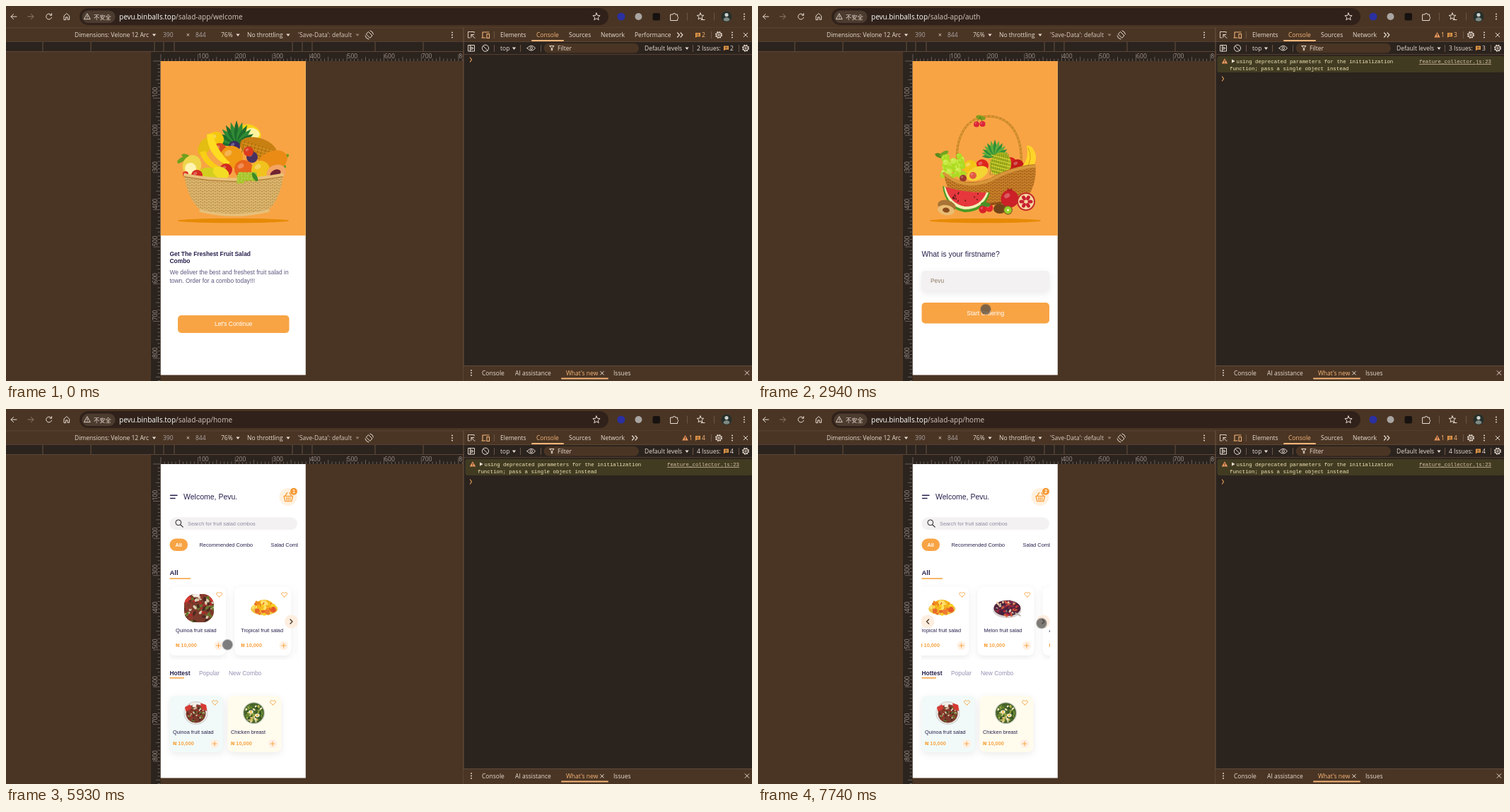
Write an HTML page that moves like this. It is 1055 px wide and 531 px high and loops after 8000 ms.

```html
<!DOCTYPE html>
<html lang="en">
<head>
<meta charset="utf-8">
<title>Salad app walkthrough</title>
<style>
html, body { margin: 0; width: 100%; height: 100%; overflow: hidden; background: #4a3524; }
svg { display: block; width: 100%; height: 100%; }
text { white-space: pre; }
.ui { font-family: "Open Sans", "Noto Sans", "Noto Sans CJK SC", sans-serif; }
.app { font-family: "Liberation Sans", Arial, sans-serif; }
.mono { font-family: "Liberation Mono", monospace; }
.soft { filter: drop-shadow(0 3px 5px rgba(40, 40, 40, .09)); }
</style>
</head>
<body>
<svg id="stage" viewBox="0 0 1055 531" preserveAspectRatio="none"></svg>
<script>
const LOOP = 8000;
const INK = '#e9ddd2', DIM = '#8d7a6b', GOLD = '#f6b679', BAR = '#4a3524', DARK = '#2b231e';
const ORANGE = '#f8a445', NAVY = '#27214d';
const USER = 'Pevu';

let seed = 11;
const rnd = () => (seed = seed * 16807 % 2147483647) / 2147483647;
const range = (n, f) => Array.from({ length: n }, (_, i) => f(i)).join('');

const text = (x, y, s, size = 8.5, fill = INK, cls = 'ui', more = '') =>
  `<text x="${x}" y="${y}" font-size="${size}" fill="${fill}" class="${cls}" ${more}>${s}</text>`;
const app = (x, y, s, size = 7.36, fill = NAVY, more = '') => text(x, y, s, size, fill, 'app', more);
const rect = (x, y, w, h, fill, r = 0, more = '') =>
  `<rect x="${x}" y="${y}" width="${w}" height="${h}" rx="${r}" fill="${fill}" ${more}/>`;
const oval = (x, y, rx, ry, fill, rot = 0) =>
  `<ellipse cx="${x}" cy="${y}" rx="${rx}" ry="${ry}" fill="${fill}" transform="rotate(${rot} ${x} ${y})"/>`;
const dot = (x, y, r, fill) => oval(x, y, r, r, fill);
const shape = (d, fill, more = '') => `<path d="${d}" fill="${fill}" ${more}/>`;
const line = (d, color = INK, w = 1, more = '') =>
  `<path d="${d}" fill="none" stroke="${color}" stroke-width="${w}" stroke-linecap="round" stroke-linejoin="round" ${more}/>`;
const ring = (x, y, r, color = INK, w = 1, more = '') =>
  `<circle cx="${x}" cy="${y}" r="${r}" fill="none" stroke="${color}" stroke-width="${w}" ${more}/>`;
const group = (id, body) => `<g id="${id}">${body}</g>`;

const caret = (x, y, c = INK) => shape(`M${x - 2.6} ${y - 1.5}h5.2l-2.6 3.6z`, c);
const kebab = (x, y) => [-3.5, 0, 3.5].map(d => dot(x, y + d, .95, INK)).join('');
const cross = (x, y, r = 2.8) => line(`M${x - r} ${y - r}l${2 * r} ${2 * r}m0 ${-2 * r}l${-2 * r} ${2 * r}`);
const gear = (x, y) => ring(x, y, 4.2, INK, 1.6, 'stroke-dasharray="2 1.3"') + ring(x, y, 3.4) + ring(x, y, 1.2);
const sep = (x, y, h = 10) => rect(x, y - h / 2, 1, h, '#6b5644');
const chevron = (x, y, dx, color, w = 1.2) => line(`M${x - dx} ${y - 3}l${2 * dx} 3l${-2 * dx} 3`, color, w);
const star = (x, y, r) => line('M' + Array.from({ length: 10 }, (_, i) => {
  const a = -Math.PI / 2 + i * Math.PI / 5, k = i % 2 ? r * .45 : r;
  return (x + k * Math.cos(a)).toFixed(1) + ' ' + (y + k * Math.sin(a)).toFixed(1);
}).join('L') + 'z');
const bubble = (x, y) => shape(`M${x - 3.5} ${y - 3}h7v5.2h-5l-2 1.8z`, '#f0a04a') +
  rect(x - 2, y - 1.6, 4, .8, BAR) + rect(x - 2, y + .1, 4, .8, BAR);
const warn = (x, y) => shape(`M${x} ${y - 3.8}l4.2 7.4h-8.4z`, '#f09a5e') +
  rect(x - .5, y - 1.4, 1, 2.4, DARK) + rect(x - .5, y + 1.7, 1, 1, DARK);

function browserBar() {
  return rect(0, 0, 1055, 31, BAR) +
    line('M15 15h-8m3.6-3.6l-3.6 3.6l3.6 3.6') + line('M31 15h8m-3.6-3.6l3.6 3.6l-3.6 3.6', DIM) +
    line('M64 12.6a4 4 0 1 0 .6 3.6M64.6 10.6v2.6h-2.6') + line('M82 19.2v-5.2l3.8-3.4l3.8 3.4v5.2h-2.6v-3.4h-2.4v3.4z') +
    rect(104, 3, 748, 24, '#30221a', 12) + rect(107.5, 6.5, 47, 17.5, '#4c3b2f', 9) +
    line('M115 11l4.2 7.6h-8.4zM115 13.8v2M115 17v.1', INK, .9) + text(124, 18.5, '不安全', 8.2) +
    ['welcome', 'auth', 'home'].map(p => group('url-' + p, text(160, 18.6,
      `${USER.toLowerCase()}.binballs.top<tspan fill="#d5c8bc">/salad-app/${p}</tspan>`, 10, '#fff'))).join('') +
    star(835, 15.3, 5.4) + dot(870, 15, 5.5, '#2b30a0') + dot(894.5, 15, 5, '#a9a5a2') + rect(914.5, 10, 10.5, 10.5, '#17120f', 2) +
    line('M940 12h3.2a1.7 1.7 0 0 1 3.4 0h3v3a1.7 1.7 0 0 1 0 3.2v2.3h-9.6z') +
    sep(963, 15, 11) + star(982, 14.8, 5) + line('M983 19.5h5') + sep(1001, 15, 11) +
    dot(1019, 15, 7.5, '#25302b') + dot(1019, 12.5, 2.6, '#cfd2cf') + shape('M1014.5 20a4.5 4 0 0 1 9 0a7 7 0 0 1 -9 0z', '#7f8a84') + kebab(1044, 15);
}

function deviceBar() {
  const grey = '#aba2a4';
  return rect(0, 30.5, 1055, .8, '#5d4736') +
    text(97, 44, 'Dimensions: Velone 12 Arc') + caret(209.5, 41) + text(222, 44, '390', 8.5, grey) + text(255, 44, '×') +
    text(268, 44, '844', 8.5, grey) + text(304, 44, '76%') + caret(328, 41) + text(341, 44, 'No throttling') + caret(399, 41) +
    text(413, 44, "'Save-Data': default", 8.5, '#d9cbbf') + caret(497, 41, DIM) +
    line('M509.5 39.5l3-3l5.500 5.500l-3 3zM508 42a6 6 0 0 0 5 5M515 35a6 6 0 0 1 4.500 5') + kebab(631, 41) +
    rect(0, 50, 647, 15, DARK) + rect(0, 50, 647, .8, '#5d4736') + rect(0, 64, 647, 1, '#5d4736') +
    [52, 120, 210, 223, 238, 405, 419, 433, 522, 590].map(x => rect(x - .5, 51, 1, 13, '#685241')).join('');
}

function rulers() {
  const step = 5.262, c = '#83776e', len = i => i % 10 ? i % 5 ? 3.5 : 6 : 10;
  const label = (i, more) => i && i % 10 == 0 ? text(0, 0, i * 10, 8.6, '#a2958b', 'ui', more) : '';
  return `<g clip-path="url(#rulerClip)">` + rect(205, 65, 442, 13, DARK) + rect(205, 65, 13.5, 466, DARK) +
    range(82, i => rect(218.6 + i * step, 78 - len(i), .7, len(i), c) + label(i, `transform="translate(${219.4 + i * step} 74)"`)) +
    range(87, i => rect(218 - len(i), 77.6 + i * step, len(i), .7, c) + label(i, `transform="translate(213.5 ${77 + i * step}) rotate(-90)"`)) + '</g>';
}

function devtools() {
  const issue = n => group('count' + n, (n == 2
    ? text(889, 44, 'Performance') + chevron(951, 41, 1.4, INK) + chevron(955.5, 41, 1.4, INK)
    : chevron(887, 41, 1.4, INK) + chevron(891.5, 41, 1.4, INK) + warn(960.5, 40.8) + text(966, 44, '1', 8.5, GOLD)) +
    text(984, 44, n, 8.5, GOLD) + text(977, 62.6, n + ' Issues:') + text(1024, 62.6, n));
  return rect(647, 31, 408, 20, BAR) + rect(647, 51, 408, 459, DARK) + rect(646.5, 31, 1, 500, '#6b5443') +
    rect(647, 50, 408, .8, '#5f4938') + rect(647, 68.3, 408, .8, '#5f4938') +
    line('M662 38v-1.5h-8.5v8.5h2.5', INK, 1, 'stroke-dasharray="1.5 1"') + line('M658 40.5l5 5m-5-1.2v-3.8h3.8') +
    line('M674 44.5v-7.5h9M673 45h5M680 39.5h3.5v6h-3.5z', GOLD, 1.1) + sep(690, 41) +
    text(699, 44, 'Elements') + text(750, 44, 'Console', 8.5, GOLD) + rect(743, 48, 46, 2, GOLD, 1) +
    text(796, 44, 'Sources') + text(841, 44, 'Network') + bubble(978.5, 41) + sep(997, 41) + gear(1008, 41) + kebab(1027, 41) + cross(1046, 41) +
    line('M654 55.5h8.5v8.5h-8.5zM656.5 55.5v8.5M658.5 58l2.5 1.8l-2.5 1.8z') + ring(678, 59.7, 4.6) + line('M674.8 56.5l6.4 6.4') + sep(690, 60) +
    text(699, 62.6, 'top') + caret(718.5, 60) + sep(727, 60) + line('M737 59.7q5.8-7 11.6 0q-5.8 7-11.6 0z') + ring(742.8, 59.7, 1.7) + sep(756, 60) +
    rect(760.5, 53, 134.5, 13.5, BAR, 6.7) + line('M769 56.5h6l-2.3 3v3.2h-1.4v-3.2z') + text(780, 62.6, 'Filter') +
    text(903, 62.6, 'Default levels') + caret(963, 60) + sep(971, 60) + bubble(1018.5, 59.5) + sep(1036, 60) + gear(1046, 59.7) +
    [2, 3, 4].map(issue).join('') +
    group('prompt', chevron(657.5, 76, 1.1, '#e8a05c')) +
    group('warning', rect(649.5, 71, 406, 23, '#413b22', 3) + warn(660, 78) + shape('M670 75.5l4.6 2.6l-4.6 2.6z', INK) +
      text(676.5, 81, 'using deprecated parameters for the initialization', 7.4, '#f3e5b5', 'mono') +
      text(667, 91, 'function; pass a single object instead', 7.4, '#f3e5b5', 'mono') +
      text(935, 81, 'feature_collector.js:23', 7.4, '#d9c3a6', 'mono', 'text-decoration="underline"')) +
    rect(647, 509.5, 408, 21.5, BAR) + rect(647, 509, 408, .8, '#6b5443') + kebab(658, 519.5) +
    text(673, 522.7, 'Console') + text(720, 522.7, 'AI assistance') + text(792, 522.7, "What's new", 8.5, GOLD) + cross(843, 519.8, 2.3) +
    rect(785, 526.5, 67, 2, GOLD, 1) + text(859, 522.7, 'Issues') + cross(1048, 519.5);
}

const crown = (x, y, r, light, dark) => range(13, i => {
  const k = r * (1 - Math.abs(i - 6) * .04);
  return shape(`M${x} ${y}q${-r * .2} ${-k * .5} 0 ${-k}q${r * .2} ${k * .5} 0 ${k}`, i % 2 ? light : dark,
    `transform="rotate(${(i - 6) * 15} ${x} ${y})"`);
});
const leaf = (x, y, rot, c = '#6f9f1d') => oval(x, y, 7, 3, c, rot);
const ball = (x, y, r, c, hi = '#ffffff44') => dot(x, y, r, c) + oval(x - r * .3, y - r * .35, r * .35, r * .25, hi, -30);
const woven = (d, fill, pattern) => shape(d, fill) + shape(d, `url(#${pattern})`);

function fullBasket() {
  const bowl = 'M252 238Q321 251 392 238Q389 272 371 289Q322 303 275 289Q256 272 252 238z';
  return oval(344, 181, 17, 13, '#f7d21a', 20) + oval(349, 180, 10, 7, '#fff3a0', 20) +
    crown(326, 195, 33, '#2f8a35', '#1d6b2c') +
    oval(357, 202, 27, 15, '#c98012', 18) + range(10, i => line(`M${333 + i * 5} ${189 + i * 1.7}l-5 18`, '#96600f', .8)) +
    range(4, i => line(`M${335 + i} ${194 + i * 5}l44 12`, '#e0a32c', .8)) +
    leaf(248, 218, -35) + leaf(255, 213, 20) + leaf(394, 214, -30) + leaf(390, 225, 30) + leaf(283, 198, -35, '#4a8f23') +
    ball(297, 189, 11, '#f4c70f') + oval(281, 199, 14, 8, '#e3bd12', -60) + ball(302, 204, 10, '#d94e1d') +
    ball(323, 199, 8, '#3b2b62') + oval(376, 221, 23, 15, '#ea8b16', -25) + ball(348, 214, 8, '#4a315f') +
    oval(263, 226, 13, 15, '#efd54a', 15) + oval(261, 230, 8, 8, '#fff4b1') +
    ball(343, 206, 7, '#dc3b1d') + ball(319, 214, 16, '#f09a13') +
    shape('M284 182q1 29 27 43l6-3q-19-17-25-42z', '#ffdc22') + shape('M274 207q6 19 24 25l4-4q-16-9-20-23z', '#f9ce16') +
    ball(336, 231, 13, '#e9651b') + ball(311, 232, 9, '#cf2a1c') + ball(360, 232, 13, '#f1c21d') +
    oval(293, 239, 20, 9, '#d3cf1e', 15) + oval(304, 236, 12, 8, '#f2dc24', 25) + ball(270, 240, 8, '#d42d20') +
    oval(382, 236, 14, 11, '#f4a563', -25) + oval(381, 237, 8, 5, '#702431', -25) + ball(254, 238, 4, '#df3124') +
    woven(bowl, '#d6ab60', 'straw') +
    line('M253 239Q321 252 391 239', '#e9c27a', 4) + line('M253 242Q321 255 391 242', '#a9722d', 1) +
    line('M275 290Q322 302 371 290', '#e6c07a', 3.5) +
    range(20, i => ball(329 + i % 6 * 4.5 + rnd() * 2, 238 + Math.floor(i / 6) * 3.5, 3, '#a9c62c')) + leaf(352, 242, 60, '#3c8a25');
}

function handleBasket() {
  const body = 'M263 235Q290 258 328 244Q360 226 392 224Q395 248 383 268Q335 286 286 281Q265 262 263 235z';
  const rope = 'M286 240C274 205 285 157 326 156C362 157 374 190 372 224';
  return line(rope, '#bf7d22', 3) + line(rope, '#e0a038', 1.6, 'stroke-dasharray="3 2.5"') +
    leaf(315, 158, 15, '#7d9c20') + line('M309 165l5-8l4 8', '#517a22', .8) + ball(309, 167.5, 4, '#dd2538') + ball(317.5, 167, 4, '#dd2538') +
    leaf(257, 212, 20, '#588a1c') + leaf(263, 209, -30, '#74a323') +
    ball(317, 226, 9, '#dd241e') + ball(357, 223, 9, '#d9201d') + ball(367, 226, 9, '#c31b18') + ball(300, 228, 10, '#f3c417') +
    crown(335, 213, 24, '#5fae3c', '#2f8f38') +
    oval(343, 224, 15, 17, '#a9b31d', 15) + range(8, i => line(`M${333 + i * 3} 210l-5 29`, '#6f8a19', .8)) + range(6, i => line(`M330 ${211 + i * 5}l27 7`, '#e8df3d', 1)) +
    shape('M380 198q9-2 13 14q1 16-13 20q-11 1-8-4q12-10 8-30z', '#ffd428') + line('M382 201q8 15-3 29', '#d99b16', 1) +
    range(50, i => ball(261 + rnd() * 30, 211 + rnd() * 31, 4, i % 3 ? '#aedb22' : '#c9ea45')) +
    oval(310, 237, 16, 9, '#f4d433', -25) + ball(290, 244, 5, '#9e3a2c') + ball(304, 240, 5, '#e25a45') +
    woven(body, '#c1751f', 'wicker') + line('M263 237Q290 261 328 247Q360 229 391 227', '#d8963a', 4) + line('M286 281Q335 286 382 268', '#8c4d16', 3) +
    shape('M261 255Q295 266 328 264Q321 292 292 292Q265 287 261 255z', '#4c9a22') +
    shape('M263 256Q295 266 326 264Q318 288 292 288Q268 284 263 256z', '#f1f0b5') +
    shape('M265 256Q295 265 323 264Q315 284 293 284Q271 280 265 256z', '#e6373c') +
    range(14, () => oval(274 + rnd() * 38, 264 + rnd() * 13, .7, 1.3, '#4f1519')) +
    ball(356, 273, 12.5, '#cc1f28') + shape('M352 262l1-4l3 2l3-2l1 4z', '#b21d22') +
    dot(379, 277, 13, '#c42b2b') + dot(379, 277, 11, '#f6d7a0') + range(6, i => oval(379 + 6 * Math.cos(i * 1.047), 277 + 6 * Math.sin(i * 1.047), 3.6, 2.5, '#c91f31', i * 60)) +
    oval(342, 287, 9, 7, '#75451a') + dot(353.5, 289, 6.5, '#88591f') + dot(353.5, 289, 5.3, '#93cc27') + dot(353.5, 289, 1.8, '#edf0b5') +
    ball(318, 288, 5.5, '#d9222a') + ball(327, 286, 5.5, '#e5262d') + leaf(322, 281, 10, '#4a8e27') +
    oval(267, 283, 13, 8, '#a87335', 15) + oval(266, 289, 12, 7, '#e9bd73', 10) + oval(266, 289, 5, 3.5, '#8a4c1c', 10);
}

// Food plates are centred on 0,0 and built from scattered pieces.
function scatter(n, rx, ry, colors, size) {
  return range(n, i => {
    const a = rnd() * 6.283, k = Math.sqrt(rnd()) * .9;
    return oval((Math.cos(a) * rx * k).toFixed(1), (Math.sin(a) * ry * k).toFixed(1), size * (.6 + rnd() * .7), size * .6, colors[i % colors.length], Math.round(rnd() * 180));
  });
}
const food = {
  quinoa: oval(0, 0, 21, 20, '#cfd0cf') + oval(0, 0, 19.5, 18.5, '#efefed') + oval(0, 1, 17, 16, '#7a3a2b') +
    scatter(95, 17, 16, ['#a92c2a', '#4b2922', '#d9c9ae', '#68762f', '#8e3c2e'], 2) +
    shape('M8-17l10 3l1 11l-9-4zM-19-10l9-5l3 7l-10 6z', '#d63a33') + shape('M-7-18l9 0l-2 8l-5 0z', '#f3ebe2'),
  tropical: oval(0, 1, 19, 9, '#efc545') + oval(0, -3, 13, 9, '#f2b61c') + scatter(48, 18, 10, ['#f7cf23', '#ef8b1c', '#f3b11d', '#e9602a', '#ffe16a'], 3.2) +
    dot(-10, 4, 3.4, '#e8692c') + dot(4, 5, 3.4, '#ee7c35') + dot(13, 1, 3, '#e6552c'),
  melon: oval(0, 3, 20, 11, '#d9d2d0') + oval(0, 0, 19, 11, '#53233b') + scatter(65, 18, 12, ['#b4243a', '#37233f', '#7b2e48', '#e8c7a5', '#d15a3c'], 2.4) + line('M12 7l9 5', '#b8b0ae', 2),
  chicken: oval(0, 0, 19, 19, '#cfcfc8') + oval(0, 0, 17.5, 17.5, '#47652a') + scatter(75, 17, 17, ['#6d8d32', '#2f4a22', '#d9c064', '#f0e6c0', '#98a941'], 2.4) +
    oval(-5, -2, 4, 3, '#f7f0d6') + dot(-5, -2, 1.7, '#eeb52b') + oval(6, 4, 4, 3, '#f7f0d6') + dot(6, 4, 1.7, '#eeb52b')
};
const plate = (x, y, kind, scale = 1, id = '') =>
  `<g class="photo" transform="translate(${x} ${y}) scale(${scale})" clip-path="url(#plateClip)"><g ${id && `id="${id}"`}>${food[kind]}</g></g>`;
const heart = (x, y) => line(`M${x} ${y + 3}q-6-4-3-6q2-1 3 1q1-2 3-1q3 2-3 6z`, ORANGE, .9);
const plus = (x, y) => dot(x, y, 6.2, '#fff1e4') + line(`M${x - 3} ${y}h6m-3-3v6`, ORANGE, 1);
const price = (x, y) => app(x, y, '₦ 10,000', 7.36, ORANGE, 'font-weight="bold"');
const card = (x, name, kind, id) => rect(x, 252, 80, 97, '#fff', 8, 'class="soft"') + plate(x + 42, 282, kind, 1, id) +
  heart(x + 70.5, 263) + app(x + 9, 316, name) + price(x + 9, 337) + plus(x + 69.5, 335);
const hotCard = (x, name, kind, bg) => rect(x, 406, 76, 80, bg, 8, 'class="soft"') + plate(x + 37, 430.5, kind, .82) +
  heart(x + 64, 416) + app(x + 4.5, 460, name) + price(x + 4.5, 476) + plus(x + 63.5, 474);
const arrow = (x, dx) => dot(x, 301, 9.5, '#fdeee0') + chevron(x, 301, dx, '#4d3420', 1.4);

const hero = rect(218.5, 78, 206, 247, ORANGE) + oval(321.5, 304, 79, 3.2, '#e68a06');
const button = (x, y, w, h, label) => rect(x, y, w, h, ORANGE, 5) + app(x + w / 2, y + h / 2 + 2.8, label, 8.42, '#fff', 'text-anchor="middle"');

function welcome() {
  const bold = 'font-weight="bold"', soft = '#5d577e';
  return hero + fullBasket() + app(231.5, 354, 'Get The Freshest Fruit Salad', 8.42, NAVY, bold) + app(231.5, 364, 'Combo', 8.42, NAVY, bold) +
    app(231.5, 379.6, 'We deliver the best and freshest fruit salad in', 8.42, soft) +
    app(231.5, 392.3, 'town. Order for a combo today!!!', 8.42, soft) + button(243, 438, 157.5, 25, "Let's Continue");
}
function auth() {
  return hero + group('gift', handleBasket()) + app(231.5, 355, 'What is your firstname?', 10.5) +
    rect(231.5, 375, 180.5, 29.5, '#f3f1f1', 5, 'class="soft"') + app(244, 392, USER, 8.42, '#917c68') +
    group('error', app(231.5, 423, 'Name cannot be empty.', 7.36, '#ef4444')) + group('order', button(231.5, 420, 180.5, 29.5, 'Start Ordering'));
}
function home() {
  const names = ['Quinoa fruit salad', 'Tropical fruit salad', 'Melon fruit salad', 'Apple fruit salad'];
  const kinds = ['quinoa', 'tropical', 'melon', 'tropical'];
  return line('M232.5 122.3h9.5M232.5 126.5h6.5', NAVY, 1.5) + app(251, 128, `Welcome, ${USER}.`, 10.5) +
    dot(399, 124.5, 12.5, '#fff1e0') + line('M393 123.5h12.6l-1.8 7h-9zM394.8 123l3-4.5M403.8 123l-3-4.5M397 125.5v3M399.3 125.5v3M401.6 125.5v3', ORANGE, 1.4) +
    group('badge', dot(407, 116.8, 5, '#f39a35') + app(407, 119.2, '<tspan id="cart">1</tspan>', 6.6, '#fff', 'text-anchor="middle" font-weight="bold"')) +
    rect(231.5, 153.5, 180.5, 17.5, '#f3f1f1', 8.7) + ring(243.8, 160.8, 3.9, '#222', 1) + line('M246.8 163.8l3.4 3.4', '#222', 1.1) +
    app(257, 164.6, 'Search for fruit salad combos', 7.36, '#8e8ba5') +
    rect(231.5, 183.5, 25.5, 17.5, ORANGE, 8.7) + app(244.2, 194.6, 'All', 7.36, '#fff', 'text-anchor="middle" font-weight="bold"') +
    app(273.5, 194.6, 'Recommended Combo') + `<g clip-path="url(#listClip)">${app(374.5, 194.6, 'Salad Combo')}</g>` +
    app(231.5, 235, 'All', 9.47, NAVY, 'font-weight="bold"') + rect(231.5, 239.3, 29.5, 1.6, ORANGE) +
    `<g clip-path="url(#listClip)"><g id="track">${names.map((n, i) => card(231 + i * 92.2, n, kinds[i], 'zoom' + i)).join('')}` +
    group('flash', rect(385.5, 329, 13.5, 12, '#8fc3e4', 0, 'opacity=".8"')) + '</g>' + arrow(403.5, 1.5) + group('back', arrow(240, -1.5)) + '</g>' +
    app(231.5, 376.6, 'Hottest', 8.42, NAVY, 'font-weight="bold"') + rect(231.5, 380, 20.5, 1.6, ORANGE) +
    app(273, 376.6, 'Popular', 8.42, '#9690b4') + app(315, 376.6, 'New Combo', 8.42, '#9690b4') +
    hotCard(231.5, 'Quinoa fruit salad', 'quinoa', '#f1faf8') + hotCard(313.5, 'Chicken breast', 'chicken', '#fffbed');
}

const weave = (id, light, dark) => `<pattern id="${id}" width="6" height="4" patternUnits="userSpaceOnUse">
  <path d="M0 1h4M3 3h3M0 3h1" stroke="${light}" stroke-width="1.2" opacity=".7"/>
  <path d="M5 0v2M2 2v2M0 2h6" stroke="${dark}" stroke-width=".6" opacity=".6"/></pattern>`;

document.getElementById('stage').innerHTML = `<defs>
  <clipPath id="rulerClip"><path d="M205 65h441v466h-441z"/></clipPath>
  <clipPath id="phoneClip"><path d="M218.5 78h205.3v444.5h-205.3z"/></clipPath>
  <clipPath id="listClip"><path d="M231 180h182v175h-182z"/></clipPath>
  <clipPath id="plateClip"><rect x="-21" y="-20" width="42" height="40" rx="16"/></clipPath>
  ${weave('straw', '#f0d592', '#9a6a2a')}${weave('wicker', '#dd9a40', '#74400f')}
  </defs>` + rect(0, 0, 1055, 531, BAR) + browserBar() + deviceBar() + rulers() + devtools() +
  `<g clip-path="url(#phoneClip)">${rect(218.5, 78, 206, 445, '#fff')}${group('welcome', welcome())}${group('auth', auth())}${group('home', home())}</g>` +
  group('touch', dot(0, 0, 8, '#5555554d') + dot(0, 0, 7, '#44444490'));

const $ = id => document.getElementById(id);
const show = (id, on) => $(id).setAttribute('visibility', on ? 'inherit' : 'hidden');
const move = (id, x, y) => $(id).setAttribute('transform', `translate(${x} ${y})`);
const ease = (t, a, b) => { const k = Math.min(1, Math.max(0, (t - a) / (b - a))); return k * k * (3 - 2 * k); };
const photos = [...document.querySelectorAll('.photo')];

// Pointer stops: start time, end time, target x, target y.
const stops = [
  [260, 1000, 352, 458], [1070, 1270, 345.5, 454.5], [2010, 2210, 327, 409], [2700, 2940, 322, 429.5],
  [2940, 3070, 319, 434], [3800, 4000, 313, 442.5], [4200, 4540, 333, 441], [4780, 5000, 333, 397],
  [5000, 5270, 304, 334], [5850, 6250, 391, 332], [6820, 7150, 401, 303.5]
];
function pointer(t) {
  let x = 814, y = 134;
  for (const [a, b, tx, ty] of stops) {
    const k = ease(t, a, b);
    x += (tx - x) * k;
    y += (ty - y) * k;
  }
  return [x, y];
}

function draw(t) {
  const page = t < 1410 ? 'welcome' : t < 4280 ? 'auth' : 'home';
  for (const p of ['welcome', 'auth', 'home']) {
    show(p, p == page);
    show('url-' + p, p == page);
  }
  const warned = t >= 1680, issues = !warned ? 2 : page == 'home' ? 4 : 3;
  [2, 3, 4].forEach(n => show('count' + n, n == issues));
  show('warning', warned);
  move('prompt', 0, warned ? 27 : 0);

  const failed = t >= 3210;
  show('gift', t >= 2480);
  show('error', failed);
  move('order', 0, failed ? 11.2 : 0);

  photos.forEach(p => p.setAttribute('visibility', t >= 4640 ? 'inherit' : 'hidden'));
  const zoom = (id, a, b) => $(id).setAttribute('transform', `scale(${1 + .55 * (ease(t, a, a + 230) - ease(t, b, b + 200))})`);
  zoom('zoom0', 5600, 6130);
  zoom('zoom1', 6270, 7220);
  show('badge', t >= 5720);
  $('cart').textContent = t < 6480 ? 1 : 2;
  show('flash', t >= 6690 && t < 6810);
  move('track', -105 * ease(t, 7270, 7680), 0);
  show('back', t >= 7300);

  const [x, y] = pointer(t);
  move('touch', x, y);
  show('touch', t > 260 && x < 430);
}

function tick(now) {
  draw(now % LOOP);
  requestAnimationFrame(tick);
}
draw(0);
requestAnimationFrame(tick);
</script>
</body>
</html>
```
